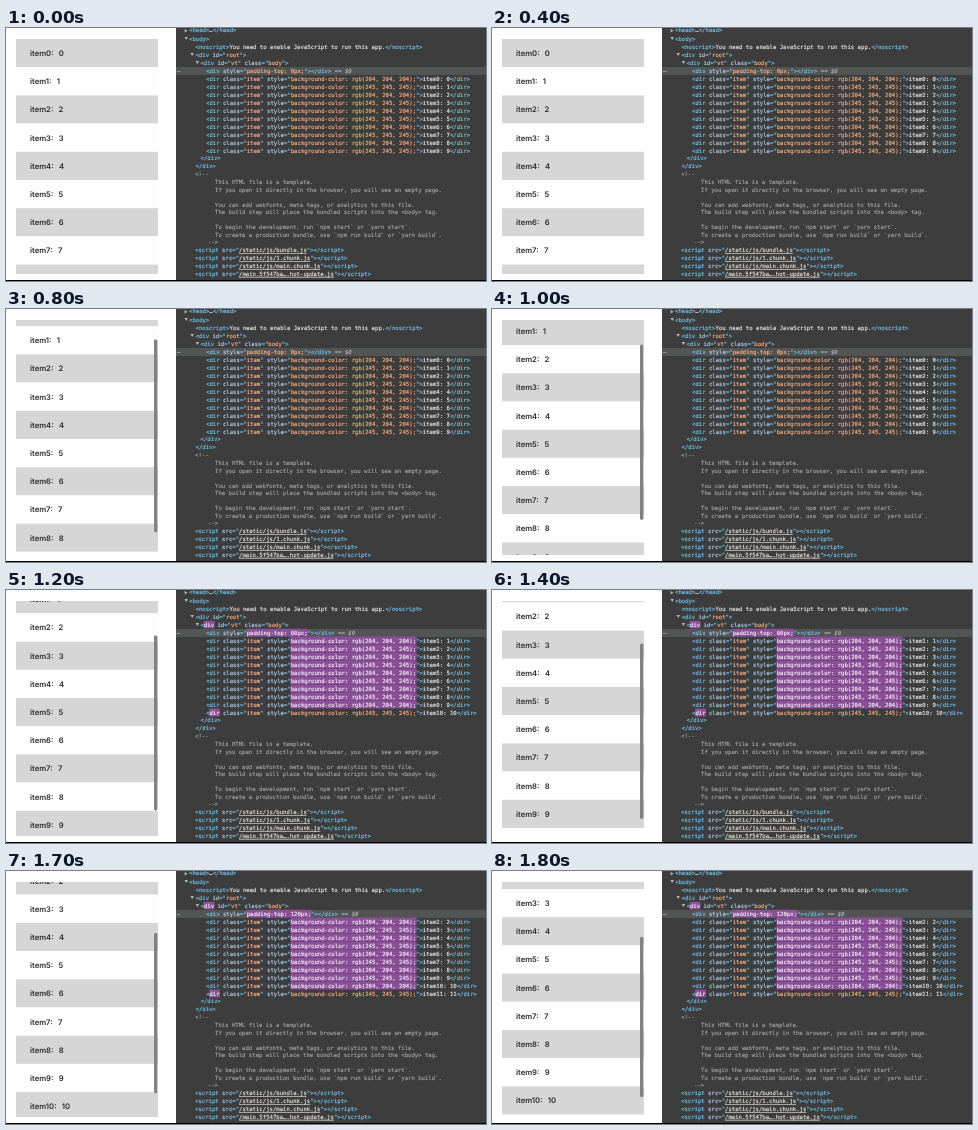
These frames come from a looping animation (480 px wide and 253 px high, 1.9 s). An HTML page:

```html
<!DOCTYPE html>
<html lang="en">
<head>
<meta charset="utf-8">
<style>
  html, body { margin: 0; width: 100%; height: 100%; overflow: hidden; background: #fff; }
  svg { display: block; width: 480px; height: 253px; }
  text { white-space: pre; text-rendering: geometricPrecision; }
  .code { font: 5.63px "DejaVu Sans Mono", monospace; }
  .code tspan { fill: currentColor; stroke: currentColor; stroke-width: 0.14px; }
  .item { font: 600 7.7px Inter, sans-serif; fill: #2c2c2c; }
  .tag { color: #74c4ee; }
  .name { color: #b2d2f0; }
  .value { color: #ffb083; }
  .link { color: #e8e4e0; text-decoration: underline; }
  .plain { color: #eaeaea; }
  .note { color: #a2a2a2; }
  .dim { color: #b4b4b4; }
  .ref { color: #b4b4b4; font-style: italic; }
  .hot { color: #fbf4fc; }
</style>
</head>
<body>
<svg id="stage" viewBox="0 0 480 253">
  <defs><clipPath id="port"><rect x="10" y="11" width="142" height="235"/></clipPath></defs>
  <g id="list" clip-path="url(#port)"></g>
  <rect x="170" width="310" height="253" fill="#3d3d3d"/>
  <rect x="170" y="39" width="310" height="8" fill="#535454"/>
  <g id="panel" class="code"></g>
  <rect y="252" width="480" height="1"/>
</svg>
<script>
const LOOP = 1900, STEP = 100;
const TOP = 11, VIEW = 235, ITEM = 28.2, COUNT = 10;
const CHAR = 3.39;
const SCROLL = [[0, 0], [400, 0], [800, 22], [1000, 31.3], [1200, 44], [1500, 60.5], [1800, 77.6]];

const list = document.getElementById("list");
const panel = document.getElementById("panel");

function add(parent, type, attrs, content = "") {
  const el = document.createElementNS("http://www.w3.org/2000/svg", type);
  for (const key in attrs) el.setAttribute(key, attrs[key]);
  el.textContent = content;
  return parent.appendChild(el);
}

// Code rows: each token is [class, text]; y is the row centre.
function row(parent, x, y, tokens) {
  let col = 0;
  for (const [cls, str] of tokens) {
    if (cls === "hot") {
      add(parent, "rect", {
        x: x + col * CHAR - 0.4, y: y - 4, width: str.length * CHAR + 0.8,
        height: 7.8, rx: 0.8, fill: "#8a4f98"
      });
    }
    col += str.length;
  }
  const line = add(parent, "text", { x, y: y + 1.9 });
  for (const [cls, str] of tokens) add(line, "tspan", { class: cls }, str);
}

const attr = (name, value, cls = "value") =>
  [["name", " " + name], ["tag", '="'], [cls, value], ["tag", '"']];
const open = (name, attrs = [], cls = "tag") =>
  [["tag", "<"], [cls, name], ...attrs, ["tag", ">"]];
const close = name => [["tag", `</${name}>`]];

function arrow(x, y, down) {
  const d = down ? "l3.6 0l-1.8 3z" : "l3 1.8l-3 1.8z";
  add(panel, "path", { d: `M${x} ${y - 1.6}${d}`, fill: "#b4b4b4" });
}

function buildPage() {
  arrow(178.6, 2.5, false);
  row(panel, 183, 2.5, [...open("head"), ["plain", "…"], ...close("head")]);
  arrow(178.4, 10.6, true);
  row(panel, 183, 10.6, open("body"));
  row(panel, 189.5, 18.6, [...open("noscript"),
    ["plain", "You need to enable JavaScript to run this app."], ...close("noscript")]);
  arrow(184.4, 26.6, true);
  row(panel, 189.5, 26.6, open("div", attr("id", "root")));
  arrow(189.6, 34.7, true);
  row(panel, 171, 42.4, [["dim", "…"]]);
  row(panel, 194.5, 130.5, close("div"));
  row(panel, 189.5, 138.5, close("div"));

  const note = [
    "This HTML file is a template.",
    "If you open it directly in the browser, you will see an empty page.",
    "",
    "You can add webfonts, meta tags, or analytics to this file.",
    "The build step will place the bundled scripts into the <body> tag.",
    "",
    "To begin the development, run `npm start` or `yarn start`.",
    "To create a production bundle, use `npm run build` or `yarn build`."
  ];
  row(panel, 189, 146.5, [["note", "<!--"]]);
  note.forEach((str, i) => row(panel, 209, 154.2 + i * 7.5, [["note", str]]));
  row(panel, 202, 214, [["note", "-->"]]);

  const files = ["/static/js/bundle.js", "/static/js/1.chunk.js",
    "/static/js/main.chunk.js", "/main.5f547ba….hot-update.js"];
  files.forEach((src, i) => row(panel, 189, 222.3 + i * 7.9,
    [...open("script", attr("src", src, "link")), ...close("script")]));
}

// The part of the tree that depends on the first rendered item.
function buildTree(first) {
  const g = add(panel, "g", {});
  const hot = first > 0;
  const changed = hot ? "hot" : "value";
  row(g, 194.5, 34.7,
    open("div", [...attr("id", "vt"), ...attr("class", "body")], hot ? "hot" : "tag"));
  row(g, 200, 42.8, [
    ...open("div", attr("style", `padding-top: ${first * 60}px;`, changed)),
    ...close("div"), ["dim", " == "], ["ref", "$0"]
  ]);
  for (let i = 0; i < COUNT; i++) {
    const n = first + i, c = i % 2 ? 245 : 204;
    const isNew = hot && i === COUNT - 1;
    const style = `background-color: rgb(${c}, ${c}, ${c});`;
    row(g, 200, 50.6 + i * 8, [
      ...open("dir", [...attr("class", "item"),
        ...attr("style", style, isNew ? "value" : changed)], isNew ? "hot" : "tag"),
      ["plain", `item${n}: ${n}`], ...close("dir")
    ]);
  }
  return g;
}

function buildItem(_, n) {
  const g = add(list, "g", {});
  const bg = add(g, "rect", { x: 10, width: 142, height: ITEM });
  const label = add(g, "text", { x: 24, y: 17, class: "item" });
  add(label, "tspan", {}, `item${n}:`);
  add(label, "tspan", { dx: 5.2 }, n);
  return { g, bg };
}

buildPage();
const trees = [0, 1, 2].map(buildTree);
const items = Array.from({ length: COUNT + 2 }, buildItem);
const thumb = add(list, "rect", { x: 148, width: 3.4, rx: 1.7, fill: "#828282" });

function scrollAt(t) {
  const i = Math.max(1, SCROLL.findIndex(p => p[0] >= t));
  const [t0, a] = SCROLL[i - 1], [t1, b] = SCROLL[i];
  return a + (b - a) * (t - t0) / (t1 - t0);
}

function draw(now) {
  const t = Math.floor(now % LOOP / STEP) * STEP;
  const pos = scrollAt(t);
  const first = Math.floor(pos / ITEM);

  items.forEach(({ g, bg }, n) => {
    const i = n - first;
    g.setAttribute("transform", `translate(0 ${TOP + n * ITEM - pos})`);
    g.setAttribute("visibility", i >= 0 && i < COUNT ? "visible" : "hidden");
    bg.setAttribute("fill", i % 2 ? "#fefefe" : "#d6d6d6");
  });

  const ratio = VIEW / ((first + COUNT) * ITEM);
  thumb.setAttribute("y", TOP + pos * ratio + 0.8);
  thumb.setAttribute("height", VIEW * ratio - 2.6);
  thumb.setAttribute("visibility", pos > 0 ? "visible" : "hidden");

  // The inspector lags slightly behind the list.
  const shown = t >= 1500 ? 2 : t >= 1100 ? 1 : 0;
  trees.forEach((g, i) => g.setAttribute("visibility", i === shown ? "visible" : "hidden"));
}

const start = performance.now();
function tick() {
  draw(performance.now() - start);
  requestAnimationFrame(tick);
}
tick();
</script>
</body>
</html>
```
